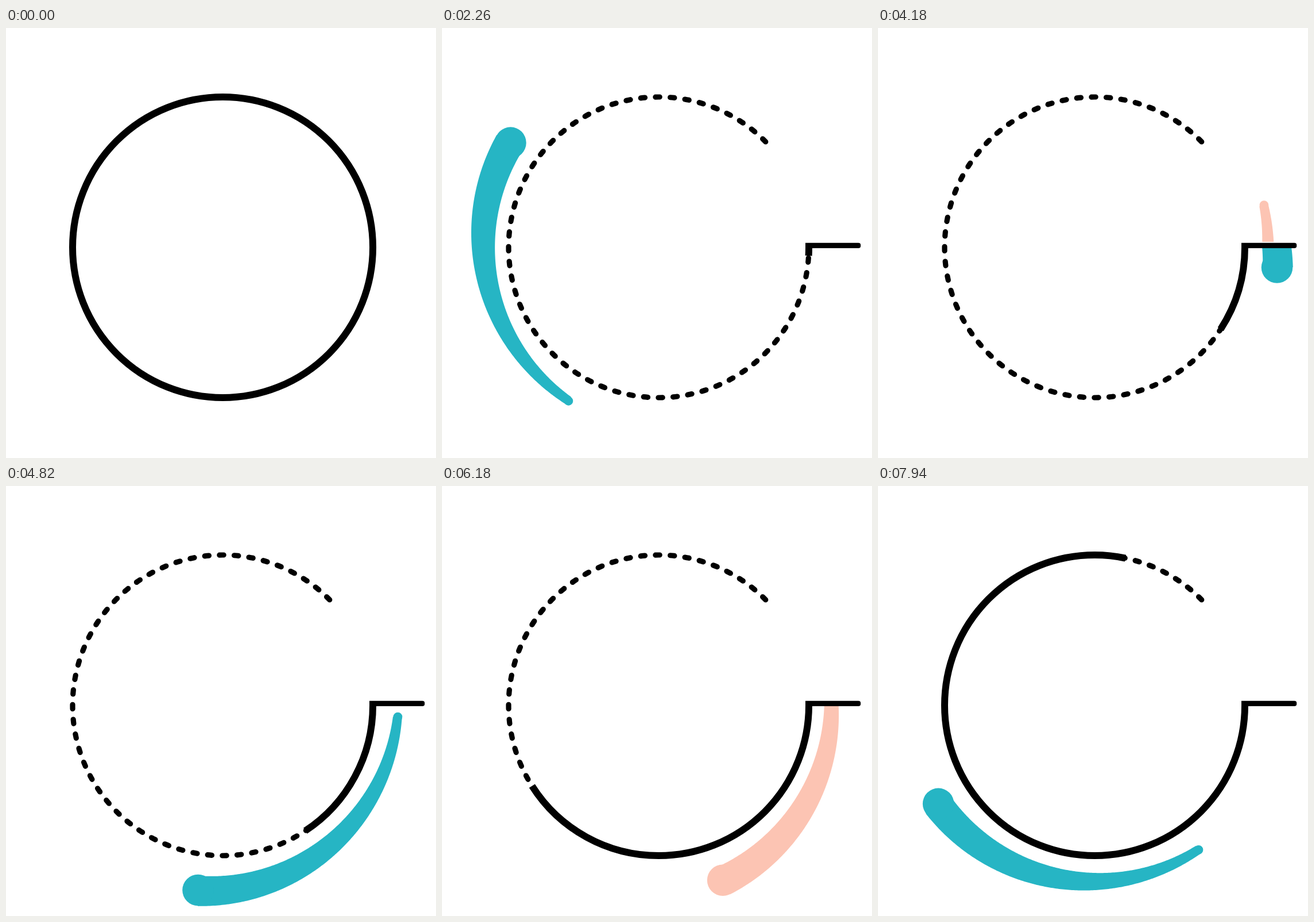
These frames come from a looping animation (749 px wide and 748 px high, 8000 ms). An HTML page with a canvas:

```html
<!DOCTYPE html>
<html lang="en">
<head>
<meta charset="utf-8">
<title>Orbit</title>
<style>
  html, body { margin: 0; width: 100%; height: 100%; overflow: hidden; background: #fff; }
  canvas { display: block; }
</style>
</head>
<body>
<canvas id="stage" width="749" height="748"></canvas>
<script>
const ctx = document.getElementById('stage').getContext('2d');
const LOOP = 8000, HOLD = 500, STEP = 80;
const WIDTH = 749, HEIGHT = 748;
const RING = { x: 377.5, y: 381.5, r: 261.5 };
const ORBIT = { x: 377.5, y: 387 };
const SPAN = 95;
const TEAL = '#26b5c4', PINK = '#fcc4b3';

// Step at which each lap begins; colours alternate from lap to lap.
const LAPS = [0, 18.6, 37.08, 55.87, 73.54];
// Reach of the solid arc in degrees, by step.
const REACH = [[0, 0], [23, 3.2], [37, 14.7], [47, 33], [62, 84.9], [77, 181], [81, 204.7], [94, 281.8]];

const rad = deg => deg * Math.PI / 180;
const cosDeg = deg => Math.cos(rad(deg));
const headAngle = step => 22 * Math.exp(0.11 * step) - 60.2;
const outerRadius = behind => 350.1 + 38 * cosDeg(behind + 95);
const innerRadius = behind => 285 + 32 * (1 - cosDeg(behind - 44));

function polar(angle, radius) {
  return [ORBIT.x + radius * cosDeg(angle), ORBIT.y + radius * Math.sin(rad(angle))];
}

// Smooth curve through the REACH points.
function reachAt(step) {
  const last = REACH.length - 1;
  const slope = k => {
    if (k === 0) return 0;
    const a = REACH[k - 1], b = REACH[Math.min(k + 1, last)];
    return (b[1] - a[1]) / (b[0] - a[0]);
  };
  let i = 0;
  while (i < last - 1 && step > REACH[i + 1][0]) i++;
  const [x0, y0] = REACH[i], [x1, y1] = REACH[i + 1];
  const w = x1 - x0, u = (step - x0) / w, v = 1 - u;
  return y0 * v * v * (1 + 2 * u) + y1 * u * u * (3 - 2 * u)
    + w * u * v * (slope(i) * v - slope(i + 1) * u);
}

function arc(from, to, width, cap) {
  ctx.beginPath();
  ctx.arc(RING.x, RING.y, RING.r, rad(from), rad(to));
  ctx.lineWidth = width;
  ctx.lineCap = cap;
  ctx.stroke();
}

function dot(angle, radius, size) {
  const [x, y] = polar(angle, radius);
  ctx.moveTo(x + size, y);
  ctx.arc(x, y, size, 0, 2 * Math.PI);
}

function drawComet(head, color) {
  if (head < -6 || head > 360 + SPAN + 4) return;
  ctx.save();
  // The bar hides whatever has not come out yet or has already gone in.
  if (head < 100 || head > 300) {
    ctx.beginPath();
    if (head < 100) ctx.rect(0, 378, WIDTH, HEIGHT);
    else ctx.rect(0, 0, WIDTH, 372);
    ctx.clip();
  }
  ctx.fillStyle = color;
  ctx.beginPath();
  for (let b = 0.5; b <= SPAN; b += 0.5) ctx.lineTo(...polar(head - b, outerRadius(b)));
  for (let b = SPAN; b >= 0; b -= 0.5) ctx.lineTo(...polar(head - b, innerRadius(b)));
  ctx.closePath();
  ctx.fill();
  ctx.beginPath();
  dot(head, 318.9, 27.3);
  dot(head - SPAN, 305.3, 7.9);
  ctx.fill();
  ctx.restore();
}

function drawTrack(step) {
  for (let k = 0; k < 56; k++) {
    const mid = 4.86 + 5.632 * k;
    arc(mid - 0.8, mid + 0.8, 9.2, 'round');
  }
  arc(0, reachAt(step), 12, 'butt');
  ctx.beginPath();
  ctx.roundRect(633, 373.7, 96.3, 9.3, [0, 4, 4, 0]);
  ctx.fill();
}

function draw(time) {
  ctx.fillStyle = '#fff';
  ctx.fillRect(0, 0, WIDTH, HEIGHT);
  ctx.fillStyle = ctx.strokeStyle = '#000';
  if (time < HOLD) {
    arc(0, 360, 12, 'butt');
    return;
  }
  const step = Math.floor((time - HOLD) / STEP) + 1;
  LAPS.forEach((start, i) => drawComet(headAngle(step - start), i % 2 ? PINK : TEAL));
  drawTrack(step);
}

function tick() {
  draw(performance.now() % LOOP);
  requestAnimationFrame(tick);
}
tick();
</script>
</body>
</html>
```
